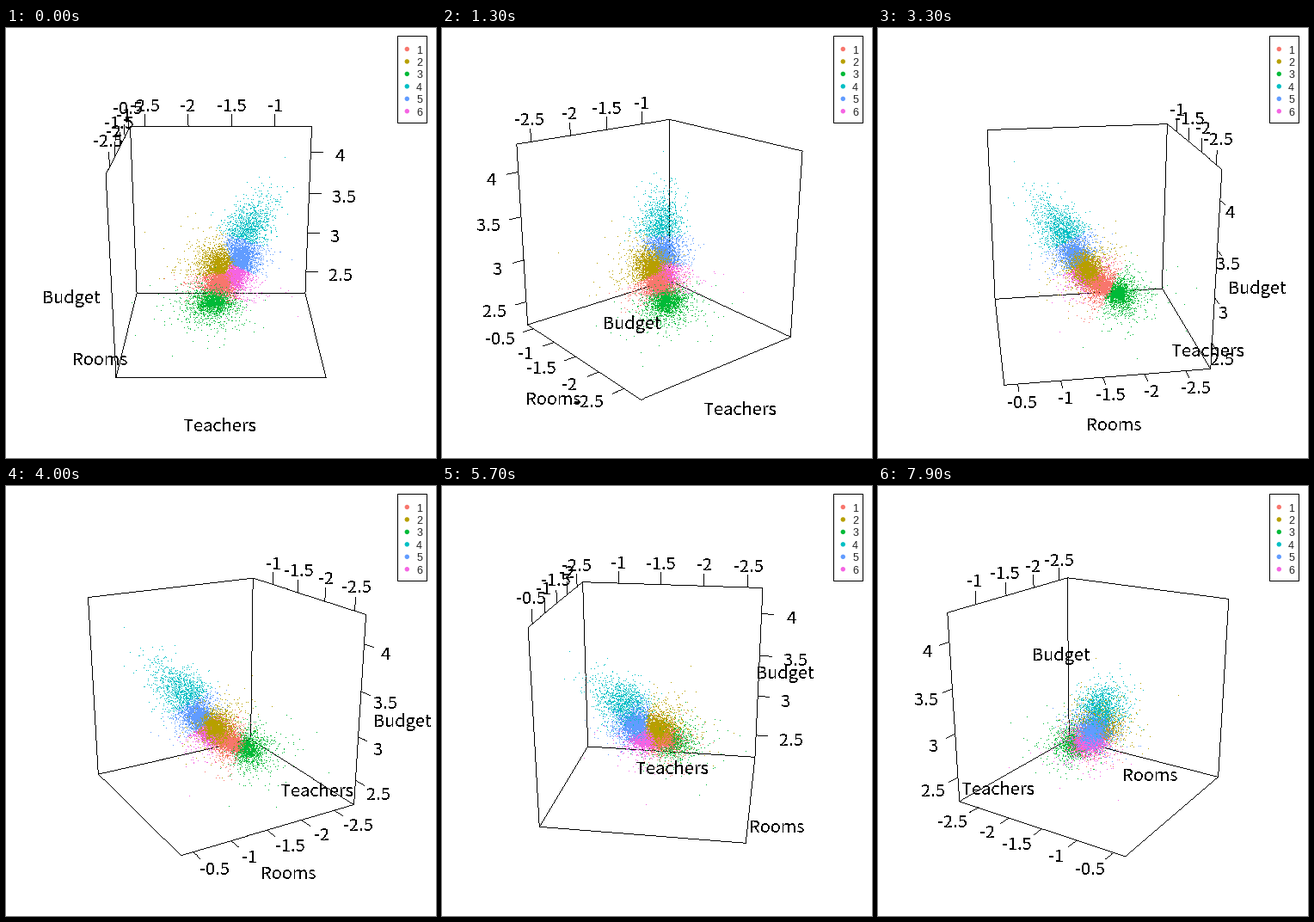
Recreate the animation shown at these times as a matplotlib script. Size 500 px wide and 500 px high, loop 8 s.

```python
import numpy as np
import matplotlib.pyplot as plt
from matplotlib.animation import FuncAnimation
from matplotlib.colors import to_rgb
from matplotlib.patches import Circle, Rectangle

SIZE, DPI, FRAMES = 500, 100, 80
PX = 72 / DPI                       # one pixel in points
STEP = 3                            # degrees per frame
TILT = np.radians(20)
FOCAL, DIST = 933, 8.245            # box spans -1..1 on every axis
MARK = 2 / 15
TITLE = 1.3
COLORS = ["#F8766D", "#B79F00", "#00BA38", "#00BFC4", "#619CFF", "#F564E3"]

# tick values and their places on the box
X_TICKS = [(v, 0.588 + 0.948 * (v + 1)) for v in (-2.5, -2, -1.5, -1)]
Y_TICKS = [(v, 0.873 + 0.811 * (v + 0.5)) for v in (-2.5, -2, -1.5, -1, -0.5)]
Z_TICKS = [(v, 0.712 + 0.958 * (v - 4)) for v in (2.5, 3, 3.5, 4)]

TITLES = [("Teachers", (0, -TITLE, -TITLE)),
          ("Rooms", (-TITLE, 0, -TITLE)),
          ("Budget", (-TITLE, -TITLE, 0))]


def project(pts, ang):
    """Screen x, screen y and depth of box points turned by ang."""
    x, y, z = np.asarray(pts, float).T
    side = x * np.cos(ang) - y * np.sin(ang)
    near = -(x * np.sin(ang) + y * np.cos(ang))
    depth = DIST - near * np.cos(TILT) - z * np.sin(TILT)
    rise = z * np.cos(TILT) - near * np.sin(TILT)
    return 250 + FOCAL * side / depth, 250 - FOCAL * rise / depth, depth


def make_cloud():
    """Peaked, heavy-tailed cloud, cut into groups by nearest center."""
    rng = np.random.default_rng(4)
    centers = np.array([(-.027, -.059, -.445), (-.035, .068, -.265),
                        (-.09, -.28, -.571), (.32, .29, .09),
                        (.23, .15, -.204), (.133, .055, -.42)])
    spread = [(.07, .05, .04), (.09, .07, .075), (.095, .075, .055),
              (.11, .11, .09), (.065, .065, .06), (.055, .05, .035)]
    counts = [2300, 2000, 2100, 1100, 2300, 2100]
    middle = centers[[0, 1, 4, 5]].mean(axis=0)
    parts = []
    for k, n in enumerate(counts):
        tail = np.minimum(np.sqrt(3 / rng.chisquare(3, (n, 1))), 3)
        p = rng.normal(size=(n, 3)) * spread[k]
        if k == 3:                  # plume, up and outwards
            t = rng.gamma(2, 0.13, (n, 1))
            p += np.array((.20, .18, -.05)) + t * np.array((.36, .40, .50))
        else:
            slant = rng.normal(size=(n, 1)) * np.array((.02, .04, .035))
            p = (p + slant) * tail + middle + 0.88 * (centers[k] - middle)
        parts.append(p)
    pts = np.vstack(parts)
    gap = ((pts[:, None] - centers) ** 2).sum(axis=2)
    return pts, gap.argmin(axis=1)


cloud, group = make_cloud()
rgb = np.array([to_rgb(c) for c in COLORS])[group]

fig = plt.figure(figsize=(SIZE / DPI, SIZE / DPI), dpi=DPI, facecolor="white")
ax = fig.add_axes([0, 0, 1, 1])
ax.set_axis_off()
scene = ax.imshow(np.ones((SIZE, SIZE, 3)), extent=(0, SIZE, SIZE, 0),
                  interpolation="nearest", zorder=1)
ax.set(xlim=(0, SIZE), ylim=(SIZE, 0), aspect="auto")


def scene_text(s):
    return ax.text(0, 0, s, family="Noto Sans CJK JP", size=20 * PX,
                   color="black", ha="center", va="baseline",
                   antialiased=False, zorder=3)


titles = [scene_text(s) for s, _ in TITLES]
labels = [[scene_text(f"{v:g}") for v, _ in ticks]
          for ticks in (X_TICKS, Y_TICKS, Z_TICKS)]
widths = [[t.get_window_extent().width for t in row] for row in labels]


def draw_legend():
    ax.add_patch(Rectangle((455, 9), 34, 101, fc="white", ec="black",
                           lw=PX, zorder=4))
    for i, color in enumerate(COLORS):
        y = 24.5 + 14.45 * i
        ax.add_patch(Circle((466.3, y), 2.7, fc=color, ec="none", zorder=5))
        ax.text(480.5, y + 5, str(i + 1), family="Liberation Sans",
                size=12.5 * PX, color="#222222", ha="center", va="baseline",
                zorder=5)


def wall(axis, value):
    """Closed outline of the box face where the axis has this value."""
    loop = np.array([(-1, -1), (1, -1), (1, 1), (-1, 1), (-1, -1)])
    return np.insert(loop, axis, value, axis=1)


def axis_edges(ang, xs, ys):
    """Per axis: fixed coordinates of its edge and the tick direction."""
    out = np.array((-xs, 0, 0))
    up = np.array((0, 0, 1))
    if abs(np.sin(ang)) < np.tan(TILT):
        y_edge = (np.array((xs, 0, 1)), up)
    else:
        y_edge = (np.array((-xs, 0, -1)), out)
    return [(np.array((0, ys, 1)), up), y_edge, (np.array((-xs, ys, 0)), out)]


def plot_pixels(img, x, y, color):
    col = np.clip(np.floor(x).astype(int), 0, SIZE - 1)
    row = np.clip(np.floor(y).astype(int), 0, SIZE - 1)
    img[row, col] = color


def draw_line(img, x, y):
    """One pixel wide polyline."""
    for x0, x1, y0, y1 in zip(x, x[1:], y, y[1:]):
        n = int(max(abs(x1 - x0), abs(y1 - y0))) + 2
        plot_pixels(img, np.linspace(x0, x1, n), np.linspace(y0, y1, n), 0)


def draw_cloud(img, ang):
    x, y, depth = project(cloud, ang)
    far_first = np.argsort(-depth)
    plot_pixels(img, x[far_first], y[far_first], rgb[far_first])


def update(i):
    ang = np.radians(STEP * i)
    # the far walls switch just after each quarter turn
    xs = 1 if np.sin(ang - 1e-4) > 0 else -1
    ys = 1 if np.cos(ang - 1e-4) > 0 else -1
    lines = [wall(2, -1), wall(0, xs), wall(1, ys)]

    edges = axis_edges(ang, xs, ys)
    for k, ticks in enumerate((X_TICKS, Y_TICKS, Z_TICKS)):
        base, out = edges[k]
        lean = out[0] * np.cos(ang) / 2
        for (_, place), text, w in zip(ticks, labels[k], widths[k]):
            p = base.astype(float)
            p[k] = place
            lines.append(np.array([p, p + MARK * out]))
            x, y, _ = project([p + 2 * MARK * out], ang)
            text.set_position((x[0] + lean * w, y[0] + 10.5))

    for text, (_, p) in zip(titles, TITLES):
        x, y, _ = project([p], ang)
        text.set_position((x[0] - 1.3, y[0] + 11))

    img = np.ones((SIZE, SIZE, 3))
    for line in lines:
        x, y, _ = project(line, ang)
        draw_line(img, x, y)
    draw_cloud(img, ang)
    scene.set_data(img)
    return [scene]


draw_legend()
anim = FuncAnimation(fig, update, frames=FRAMES, interval=100, repeat=True,
                     repeat_delay=0, blit=False, cache_frame_data=False)
plt.show()
```
